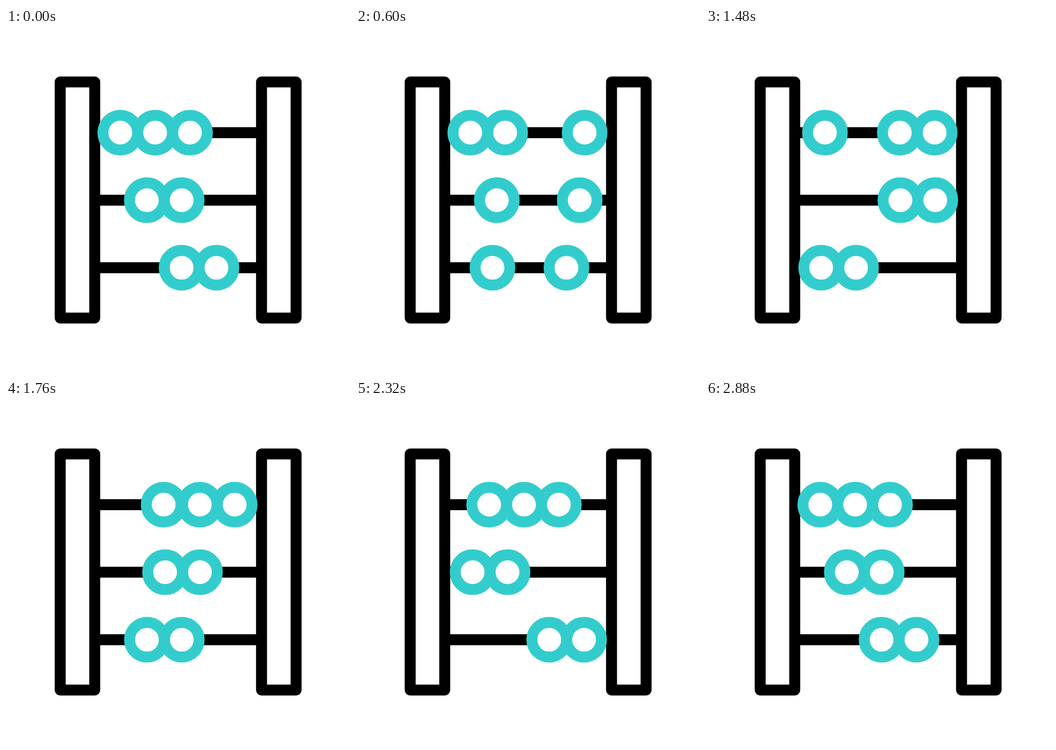
These frames come from a looping animation (640x640 px, 3000 ms). An HTML page:

```html
<!DOCTYPE html>
<html lang="en">
<head>
<meta charset="utf-8">
<title>Abacus</title>
<style>
html, body { margin: 0; height: 100%; overflow: hidden; background: #fff; }
svg { display: block; width: 100vw; height: 100vh; }
rect, path { fill: none; stroke: #000; stroke-width: 20.4; stroke-linejoin: round; }
circle { fill: #fff; stroke: #33cccc; stroke-width: 20.4; }
</style>
</head>
<body>
<svg viewBox="0 0 640 640">
  <path d="M165 194.7H475M165 320.35H475M165 446H475"/>
  <rect x="100.8" y="100.4" width="64.3" height="439.2"/>
  <rect x="475.4" y="100.4" width="64.3" height="439.2"/>
  <g id="beads"></g>
</svg>
<script>
const LOOP = 3000, STEP = 40;
const START = 200, BEAT = 600, SLIDE = 400, STAGGER = 80, HOME = 2200;
const TOP = 194.7, ROW_GAP = 125.65, BEAD_GAP = 64.85;

// Beads slide one by one by `shift`, then together to `park` by time `end`, then home.
const rows = [
  { count: 3, x: 212.6, shift: 83.1, park: 0, end: 2580 },
  { count: 2, x: 262, shift: 99.7, park: -46.3, end: 2080 },
  { count: 2, x: 326.7, shift: -112.4, park: 32.8, end: 2080 }
];

const group = document.getElementById("beads");
const beads = rows.flatMap((row, i) => Array.from({ length: row.count }, (_, k) => {
  const circle = document.createElementNS("http://www.w3.org/2000/svg", "circle");
  circle.setAttribute("cy", TOP + ROW_GAP * i);
  circle.setAttribute("r", 32.3);
  group.append(circle);
  const turn = row.shift > 0 ? row.count - 1 - k : k;
  return { circle, row, x: row.x + BEAD_GAP * k, turn, delay: STAGGER * i };
}));

function ease(t, from, to) {
  const p = Math.min(1, Math.max(0, (t - from) / (to - from)));
  return p * p * (3 - 2 * p);
}

function position({ row, x, turn, delay }, t) {
  const first = START + delay, single = first + BEAT * turn, home = HOME + delay;
  return x
    + row.shift * ease(t, single, single + SLIDE)
    + (row.park - row.shift) * ease(t, first + BEAT * row.count, row.end)
    - row.park * ease(t, home, home + SLIDE);
}

function draw() {
  const t = Math.floor(performance.now() % LOOP / STEP) * STEP;
  for (const bead of beads) bead.circle.setAttribute("cx", position(bead, t));
  requestAnimationFrame(draw);
}
draw();
</script>
</body>
</html>
```
